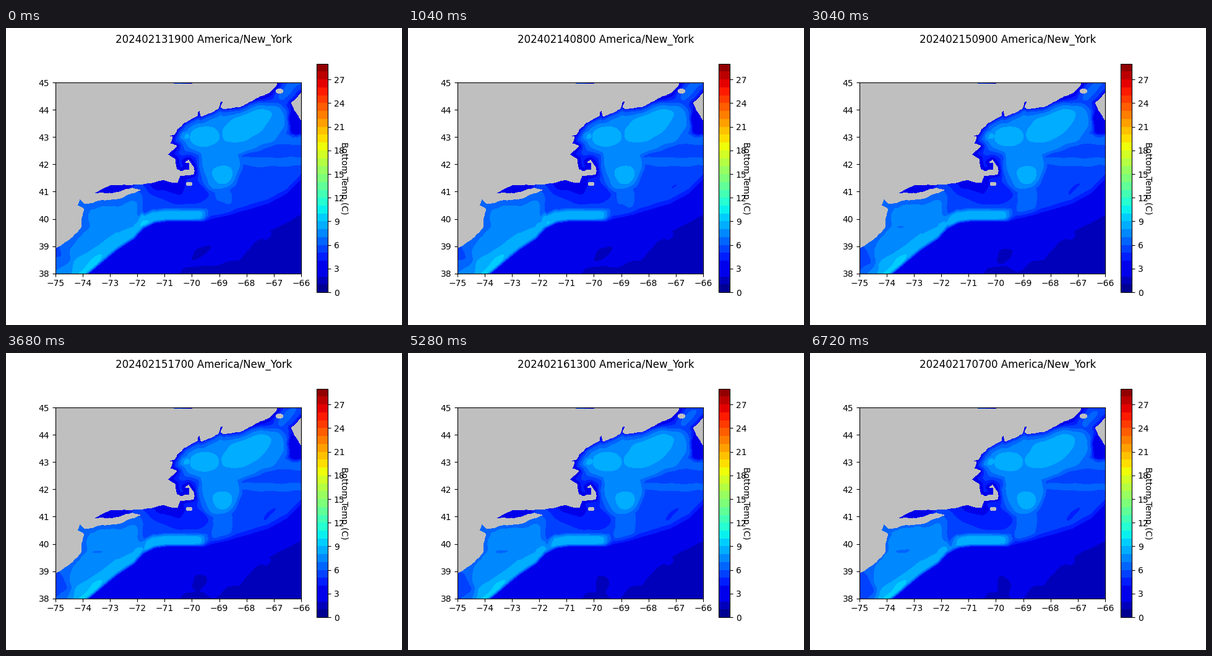
Animation, 640 px wide and 480 px high, one loop 6.8 s. Source, as a matplotlib script:

```python
import matplotlib.pyplot as plt
import numpy as np
from matplotlib.animation import FuncAnimation
from matplotlib.patches import Ellipse, Polygon

HOURS, STEP_MS = 85, 80
PX = 396.8 / 9  # pixels per degree
TIDE = 2 * np.pi / 12.42
rng = np.random.default_rng(4)

fig = plt.figure(figsize=(6.4, 4.8), dpi=100)
ax = fig.add_subplot()
title = fig.suptitle("")
levels = np.arange(30)
colors = plt.cm.jet((levels[:-1] + 0.5) / 29)
colors[2:4, :3] = 0, 0, 0.92  # both deep-sea bands share one blue
X, Y = np.meshgrid(np.linspace(-75, -66, 226), np.linspace(38, 45, 176))


def degrees(flat):
    """Stage pixels to longitude and latitude."""
    p = np.reshape(flat, (-1, 2)).astype(float)
    return np.column_stack([-75 + (p[:, 0] - 80) / PX, 45 - (p[:, 1] - 88.1) / PX])


def roughen(p, rounds=3, amount=0.06):
    """Break a closed path by seeded midpoint displacement."""
    for _ in range(rounds):
        edge = np.roll(p, -1, 0) - p
        side = np.column_stack([-edge[:, 1], edge[:, 0]])
        side *= rng.uniform(-amount, amount, (len(p), 1))
        p = np.stack([p, p + edge / 2 + side], 1).reshape(-1, 2)
    return p


def step(v, width):
    """Smooth rise from 0 to 1 around v = 0."""
    return 0.5 + 0.5 * np.tanh(v / (2 * width))


# Land: key points along the shore
MAIN = [437, 80, 437, 92, 431, 99, 419, 107, 400, 116, 376, 128, 352, 131,
        347, 127, 351, 118, 347, 118, 343, 130, 327, 138, 315, 143, 313, 133,
        309, 136, 309, 142, 288, 153, 277, 163, 271, 173, 258, 174, 269, 176,
        265, 187, 276, 191, 266, 200, 261, 205, 273, 212, 275, 228, 283, 232,
        297, 229, 296, 218, 290, 217, 295, 214, 304, 228, 303, 236, 281, 239,
        277, 250, 255, 245, 243, 248, 214, 252, 168, 254, 155, 260, 141, 267,
        162, 268, 204, 259, 217, 262, 180, 276, 127, 284, 120, 277, 118, 267,
        118, 280, 115, 287, 126, 293, 121, 322, 91, 349, 70, 361, 70, 80]
EAST = [490, 102, 477, 105, 461, 121, 466, 132, 477, 149, 490, 152]
shores = [roughen(degrees(path)) for path in (MAIN, EAST)]
for shore in shores:
    ax.add_patch(Polygon(shore, fc="0.75", lw=0, zorder=1.5, antialiased=False))
for x, y, w, h in [(296, 252, 9, 6), (442, 102, 11, 7)]:
    ax.add_patch(Ellipse(degrees([x, y])[0], w / PX, h / PX, fc="0.75", lw=0,
                         zorder=1.5, antialiased=False))
shore_dist = np.full(X.shape, 9.0)
for px, py in np.vstack(shores):
    shore_dist = np.minimum(shore_dist, np.hypot(X - px, Y - py))

# Distance to the shelf front, positive on the shelf
front = np.interp(X[0],
                  [-75, -73.78, -72.73, -72.12, -71.78, -71.37, -70.92, -69.56,
                   -68.54, -67.18, -66.49, -66],
                  [37, 37.99, 38.86, 39.26, 39.63, 39.83, 39.89, 39.88,
                   40.1, 40.49, 40.87, 41.35])
front_dist = (Y - front) / np.hypot(1, np.gradient(front, X[0]))
ramp_width = 0.13 + 0.17 * step(X + 69.5, 0.15)
ramp = np.sqrt(np.clip(front_dist / ramp_width, 0, 1))

# Edge of the coldest deep water
cold_edge = np.interp(X[0], [-70.7, -70.3, -69, -68.25, -67.7, -66.8, -66],
                      [37.8, 38.2, 38.3, 38.5, 39.15, 39.75, 40.15])

# Winter chill near the shore, strong and narrow in the north
north = step(Y - 41.6, 0.12)
chill_reach = np.exp(-shore_dist / (0.35 - 0.21 * north))

waves = [(rng.normal(0, 5, 2), rng.uniform(0, 6.3)) for _ in range(14)]


def noise(shift, hour):
    return sum(np.sin(k[0] * X + k[1] * Y + f + shift * (i + 1) + 0.01 * hour)
               for i, (k, f) in enumerate(waves)) / 4


def temperature(hour):
    t = hour / (HOURS - 1)
    wx = X + 0.05 * noise(0, hour) - 0.015 * np.sin(TIDE * hour)
    wy = Y + 0.04 * noise(2, hour) - 0.010 * np.cos(TIDE * hour)

    def mass(lon, lat, rx, ry, tilt=0, soft=0.12):
        """Flat-topped ellipse of water, 1 inside and 0 outside."""
        c, s = np.cos(np.radians(tilt)), np.sin(np.radians(tilt))
        dx, dy = wx - lon, wy - lat
        r = np.hypot((c * dx + s * dy) / rx, (c * dy - s * dx) / ry)
        return step(1 - r, soft)

    # Warm masses lie side by side
    bight_edge = -71.85 + 0.35 * np.exp(-(front_dist / 0.35) ** 2)
    slope = np.exp(-((front_dist - 0.24) / 0.23) ** 4)
    slope = slope * step(wx + 71.95 - 0.45 * t, 0.08) * step(-69.5 - wx, 0.08)
    arc = np.exp(-((wy - 42.08) / (0.2 - 0.06 * t)) ** 2) * step(wx + 68.3, 0.1)
    warm = np.maximum.reduce([
        2.2 * step(bight_edge - wx, 0.1),
        3.2 * slope,
        2.2 * mass(-68.5, 43.3, 2.1, 0.97, 10, 0.065),
        2.2 * mass(-69.0, 42.0, 0.8, 1.0, 0, 0.075),
        1.1 * arc,
        1.1 * mass(-66.3, 42.93, 0.9, 0.2),
        1.1 * mass(-66.2, 44.6 - 0.15 * t, 0.7, 0.5),
        (0.7 + 0.5 * t) * mass(-68.85, 40.7, 0.4, 0.65, -15),
    ])

    # Warm cores
    reach = 0.37 - 0.04 * t + (0.16 - 0.06 * t) * np.maximum(-72 - wx, 0)
    core = np.maximum.reduce([
        step(reach - front_dist, 0.04) * step(bight_edge - wx, 0.1),
        mass(-68.0, 43.42, 0.98, 0.48, 28),
        mass(-69.55, 43.0, 0.55, 0.33),
        mass(-70.25, 43.0, 0.17, 0.13),
        mass(-68.88, 41.62, 0.36, 0.32),
    ])
    hot = 0.9 * mass(-73.75, 38.25, 0.62, 0.13, 42)

    # Cold patches
    cold = (mass(-70.45 + 0.1 * t, 41.0, 1.1 - 0.1 * t, 0.45, -8)
            + (0.3 + 0.6 * t) * mass(-67.15, 41.1, 0.35, 0.1, 48)
            + (1 + 1.2 * t) * mass(-74.95, 38.2, 0.55, 0.7)
            + 0.9 * t * mass(-73.4, 39.75, 0.28, 0.09, 10)
            + 3.5 * mass(-73.0, 41.1, 0.85, 0.17, 9)
            + 3.2 * mass(-66.15, 43.5, 0.33, 0.42))
    chill = (1.3 - 0.4 * t + 3 * north) * chill_reach

    shelf = 5.4 + warm + 0.95 * core + hot - cold - chill + 0.1 * noise(4, hour)

    edge = cold_edge - 0.5 * t * np.exp(-((X[0] + 69.2) / 0.3) ** 2)
    deep = np.clip(2 + 2 * (wy - edge), 1.5, 2.5)
    deep = (deep - 0.8 * mass(-69.7, 38.75 - 0.2 * t, 0.42 - 0.14 * t,
                              0.17 + 0.2 * t, 30)
            + 0.7 * mass(-67.25, 39.35, 0.13, 0.1))
    return deep + (np.maximum(shelf, 2.6) - deep) * ramp


def draw_sea(hour):
    field = np.clip(temperature(hour), 0.5, 28.5)
    return ax.contourf(X, Y, field, levels=levels, colors=colors)


sea = draw_sea(0)
bar = fig.colorbar(sea, ax=ax)
bar.set_label("Bottom Temp (C)", rotation=270)
ax.set_aspect("equal")
ax.set(xlim=(-75, -66), ylim=(38, 45))


def update(hour):
    global sea
    sea.remove()
    sea = draw_sea(hour)
    stamp = np.datetime64("2024-02-13T19:00") + np.timedelta64(hour, "h")
    digits = "".join(c for c in str(stamp) if c.isdigit())
    title.set_text(f"{digits} America/New_York")
    return [sea, title]


anim = FuncAnimation(fig, update, frames=HOURS, interval=STEP_MS,
                     repeat=True, repeat_delay=0, blit=False)
plt.show()
```
